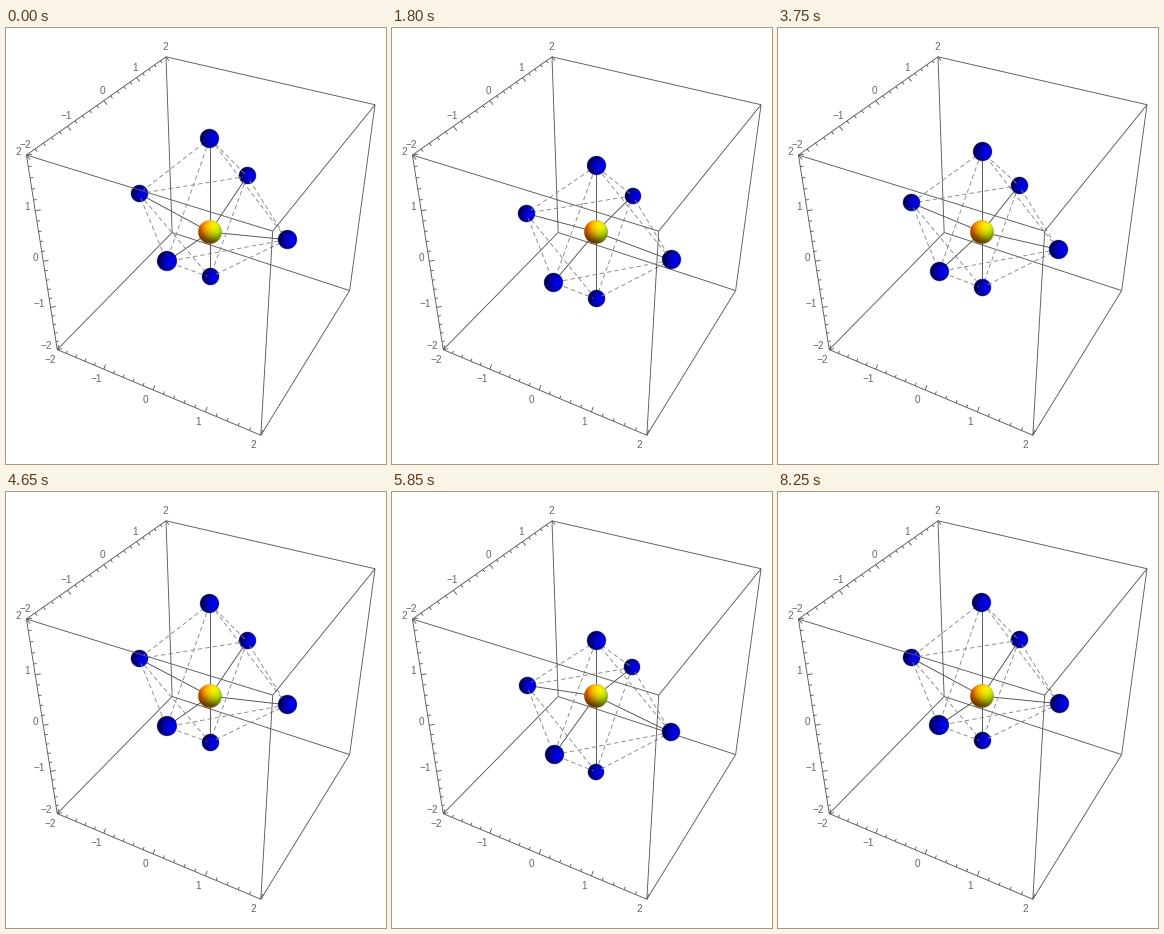
Animation, 380 px wide and 436 px high, one loop 9 s. Source, as a matplotlib script:

```python
import itertools

import matplotlib.pyplot as plt
import numpy as np
from matplotlib.animation import FuncAnimation

W, H, DPI = 380, 436, 100
PX = 72 / DPI
FRAMES, STEP_MS = 60, 150

# Perspective camera, in units of the box side (the box spans -2..2)
VIEW = np.array([1.3, -2.4, 2.0])
DIST = np.linalg.norm(VIEW)
TOWARD = VIEW / DIST
RIGHT = np.cross([0, 0, 1], TOWARD)
RIGHT /= np.linalg.norm(RIGHT)
UP = np.cross(TOWARD, RIGHT)
FOCAL = 792
CX, CY = 203.9, 204.0

BOND = np.sqrt(2)
R_CORE, R_ATOM = 0.2, 0.15
AXIAL, EQUATORIAL = 0.414, 0.34
RATE, START = np.radians(14.65), 4.9

# Coloured lights fixed to the viewer: direction and tint
AMBIENT = np.array([0.4, 0.2, 0.2])
LIGHTS = [
    ((1.5, -0.5, 1.5), (0, 0.18, 0.5)),
    ((1.5, 1.5, 1.5), (0.18, 0.5, 0.18)),
    ((-0.5, 1.5, 1.5), (0.5, 0.18, 0)),
    ((-0.5, -0.5, 1.5), (0, 0, 0.18)),
]


def depth(p):
    return np.dot(p, TOWARD) / 4


def project(p):
    p = np.asarray(p, float)
    k = FOCAL / 4 / (DIST - depth(p))
    return np.array([CX + k * np.dot(p, RIGHT), CY - k * np.dot(p, UP)])


def ball_image(color, n=72, pad=1.1):
    """Shaded sphere on a transparent square reaching pad radii from its centre."""
    c = (np.arange(n) + 0.5) / n * 2 * pad - pad
    x, y = np.meshgrid(c, -c)
    r = np.hypot(x, y)
    q = np.maximum(r, 1)
    normal = np.dstack([x / q, y / q, np.sqrt(np.clip(1 - r**2, 0, 1))])
    light = np.tile(AMBIENT, (n, n, 1))
    for direction, tint in LIGHTS:
        d = np.array(direction) / np.linalg.norm(direction)
        light += np.clip(normal @ d, 0, 1)[..., None] * np.array(tint)
    rgb = np.clip(light * np.array(color), 0, 1)
    alpha = np.clip((1 - r) * n / (2 * pad) + 0.5, 0, 1)
    return np.dstack([rgb, alpha])


fig = plt.figure(figsize=(W / DPI, H / DPI), dpi=DPI, facecolor="white")
ax = fig.add_axes([0, 0, 1, 1])
ax.axis("off")


def new_line(color="0.35", z=1, **style):
    return ax.plot([], [], color=color, lw=0.9 * PX, zorder=z,
                   solid_capstyle="butt", **style)[0]


def place_line(line, p, q):
    a, b = project(p), project(q)
    line.set_data([a[0], b[0]], [a[1], b[1]])


class Ball:
    def __init__(self, color, radius):
        self.radius = radius
        self.image = ax.imshow(ball_image(color), aspect="auto")

    def place(self, p):
        x, y = project(p)
        r = 1.1 * FOCAL * self.radius / 4 / (DIST - depth(p))
        self.image.set_extent((x - r, x + r, y + r, y - r))
        self.image.set_zorder(10 + depth(p))


def draw_box():
    corners = [np.array(c) for c in itertools.product((-2, 2), repeat=3)]
    near = np.array([2, -2, 2])
    for a, b in itertools.combinations(corners, 2):
        if np.sum(a != b) == 1:
            front = (a == near).all() or (b == near).all()
            place_line(new_line(z=30 if front else 1), a, b)


def draw_axis(axis, base, inward, offset, align):
    base, inward = np.array(base, float), np.array(inward, float)
    for i in range(-10, 11):
        p = base.copy()
        p[axis] = i / 5
        major = i % 5 == 0
        place_line(new_line(), p, p + inward * (0.06 if major else 0.035))
        if major:
            x, y = project(p) + offset
            ax.text(x, y, str(i // 5).replace("-", "\u2212"), ha=align, va="center",
                    family="Liberation Sans", size=10 * PX, color="0.4")


draw_box()
draw_axis(0, (0, -2, -2), (0, 1, 1), (-7.5, 10), "center")
draw_axis(1, (-2, 0, 2), (1, 0, -1), (-1, -10), "center")
draw_axis(2, (-2, -2, 0), (1, 1, 0), (-5.5, -3.5), "right")

DIRS = np.vstack([np.eye(3), -np.eye(3)])
SWING = np.where(DIRS[:, 2] != 0, AXIAL, EQUATORIAL)
PAIRS = [(i, j) for i, j in itertools.combinations(range(6), 2) if j - i != 3]

core = Ball((1, 1, 0), R_CORE)
core.place(np.zeros(3))
atoms = [Ball((0, 0, 1), R_ATOM) for _ in DIRS]
bonds = [new_line("0.3", z=9) for _ in DIRS]
edges = [new_line("0.53", dashes=(5, 3.3)) for _ in PAIRS]

ax.set_xlim(0, W)
ax.set_ylim(H, 0)


def swing(frame):
    """Rest, then one cosine swing down and up; the second half runs backwards."""
    k = min(frame, FRAMES - 1 - frame)
    return np.cos(RATE * max(k - START, 0))


def update(frame):
    points = BOND * DIRS
    points[:, 2] += SWING * swing(frame)
    for p, atom, bond in zip(points, atoms, bonds):
        atom.place(p)
        place_line(bond, np.zeros(3), p)
    for (i, j), edge in zip(PAIRS, edges):
        p, q = points[i], points[j]
        trim = (q - p) * R_ATOM / np.linalg.norm(q - p)
        place_line(edge, p + trim, q - trim)
        edge.set_zorder(10 + depth((p + q) / 2))
    return []


anim = FuncAnimation(fig, update, frames=FRAMES, interval=STEP_MS,
                     init_func=lambda: update(0), repeat=True, repeat_delay=0)
plt.show()
```
